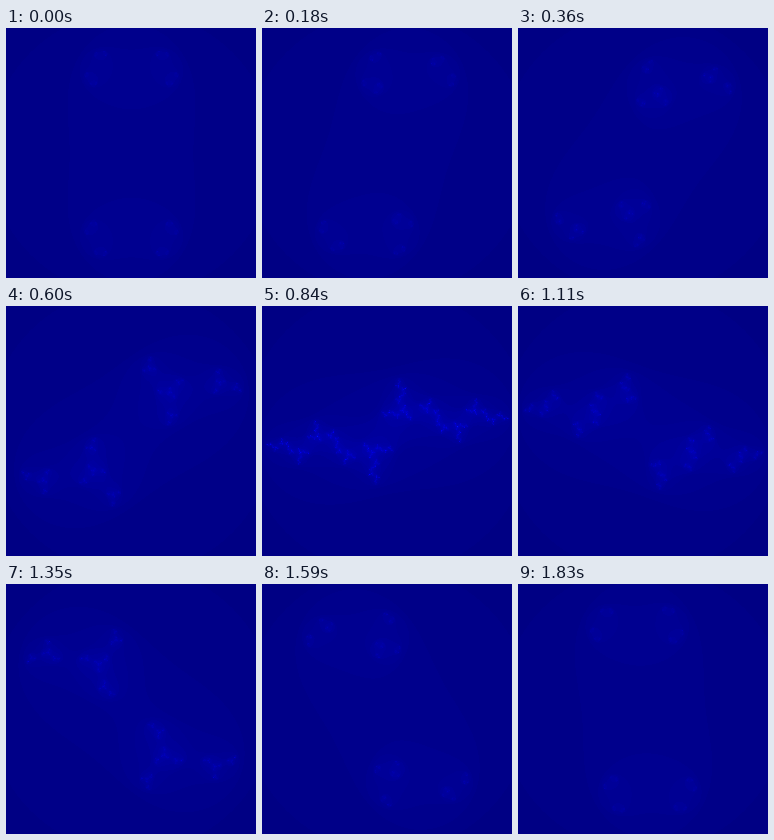
These frames come from a looping animation (250x250 px, 1.86 s). An HTML page with a canvas:

```html
<!DOCTYPE html>
<html lang="en">
<head>
<meta charset="utf-8">
<title>Julia set</title>
<style>
  html, body { margin: 0; width: 100%; height: 100%; overflow: hidden; background: #00008b; }
  canvas { display: block; width: 100vw; height: 100vh; image-rendering: pixelated; }
</style>
</head>
<body>
<canvas width="250" height="250"></canvas>
<script>
const SIZE = 250, HALF = SIZE / 2;
const STEP_MS = 30, STEPS = 62, TURN = 0.1;
const EXTENT = 1.75, RADIUS = 1.25, MAX_COUNT = 256;

const ctx = document.querySelector('canvas').getContext('2d');
const image = ctx.createImageData(SIZE, SIZE);
const pixels = new Uint32Array(image.data.buffer);

// Jet colour ramp, packed as ABGR.
const ramp = (v, peak) => Math.round(255 * Math.min(1, Math.max(0, 1.5 - Math.abs(4 * v - peak))));
const palette = Uint32Array.from({ length: MAX_COUNT + 1 }, (_, n) => {
  const v = Math.min(1, n / 255);
  return (255 << 24 | ramp(v, 1) << 16 | ramp(v, 2) << 8 | ramp(v, 3)) >>> 0;
});

// Iterations of z -> z^2 + c until |z| exceeds 2.
function escapeCount(x, y, cx, cy) {
  let n = 1;
  while (n < MAX_COUNT && x * x + y * y <= 4) {
    const re = x * x - y * y + cx;
    y = 2 * x * y + cy;
    x = re;
    n++;
  }
  return n;
}

function draw(step) {
  const cx = RADIUS * Math.cos(step * TURN);
  const cy = RADIUS * Math.sin(step * TURN);
  const scale = EXTENT / HALF;
  for (let j = 0, p = 0; j < SIZE; j++) {
    for (let i = 0; i < SIZE; i++) {
      pixels[p++] = palette[escapeCount((i - HALF) * scale, (j - HALF) * scale, cx, cy)];
    }
  }
  ctx.putImageData(image, 0, 0);
}

const start = performance.now();
let shown = -1;
function tick() {
  const step = Math.floor((performance.now() - start) / STEP_MS) % STEPS;
  if (step !== shown) draw(shown = step);
  requestAnimationFrame(tick);
}
tick();
</script>
</body>
</html>
```
